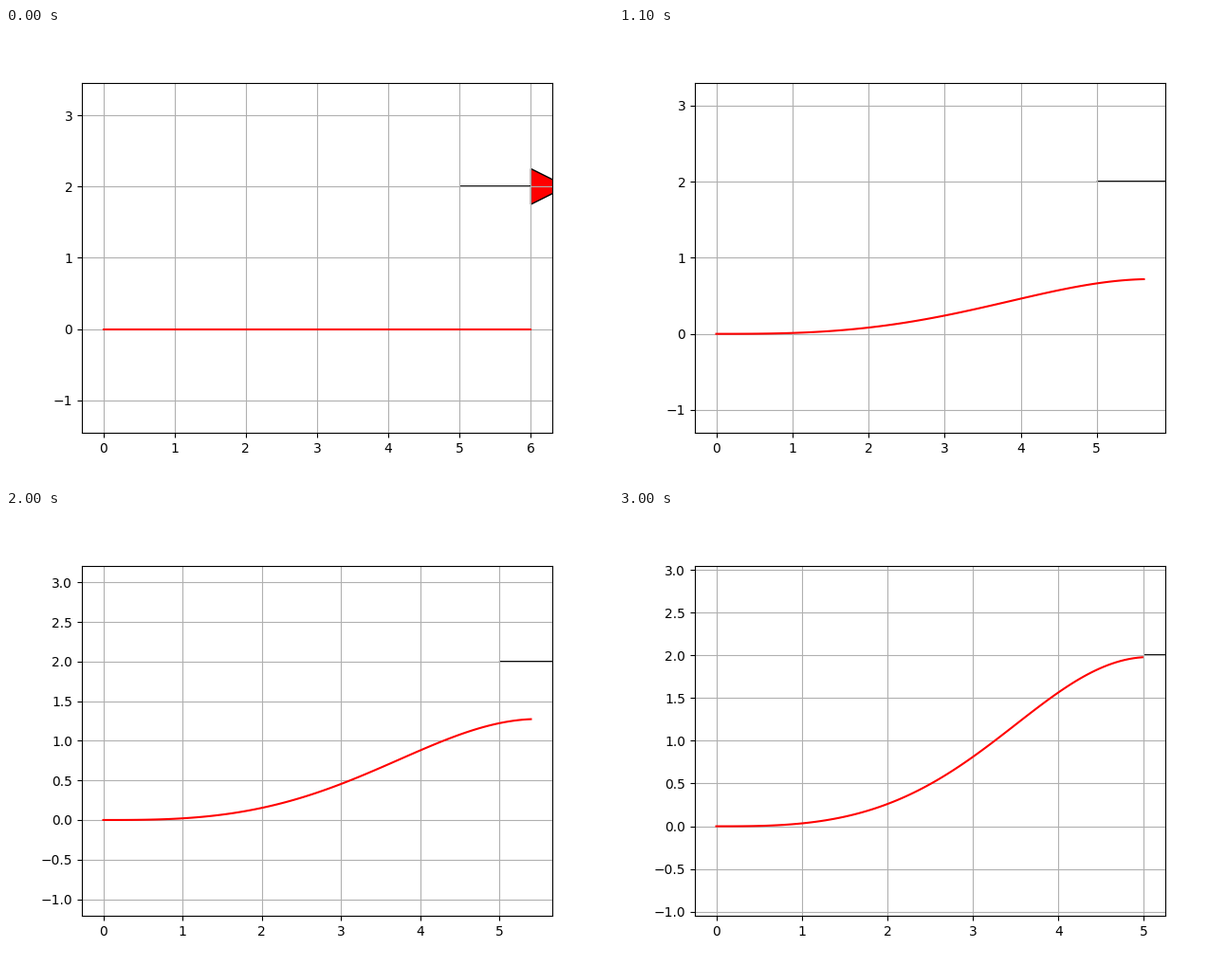
A matplotlib script that plays this animation: 640 px wide and 480 px high, repeating every 3100 ms.

```python
import numpy as np
import matplotlib.pyplot as plt
from matplotlib.animation import FuncAnimation

FRAMES = 31
INTERVAL = 100
LENGTH = 6
GOAL = (5, 2)

# Key points of the free tip, joined by straight moves
KEYS = (0, 15, 20, 26, 30)
TIP_X = (LENGTH, 5.48, 5.396, 5.144, 4.982)
TIP_Y = (0, 0.98, 1.273, 1.648, 1.977)

fig, ax = plt.subplots(figsize=(6.4, 4.8), dpi=100)
ax.grid(True)
ax.arrow(*GOAL, 1, 0, head_width=0.5, head_length=0.5, fc="red", ec="black")
rod, = ax.plot([], [], color="red")

box = ax.get_position()
ASPECT = box.height * 4.8 / (box.width * 6.4)


def bezier(points, n=100):
    """Quartic Bezier curve through five control points."""
    t = np.linspace(0, 1, n)
    weights = [c * t**k * (1 - t)**(4 - k)
               for k, c in enumerate((1, 4, 6, 4, 1))]
    return np.transpose(weights) @ np.array(points)


def rod_curve(x, y):
    """Rod clamped flat at the origin, its outer controls dragged by the tip."""
    pull = LENGTH - x
    return bezier([
        (0, 0),
        (LENGTH / 4, 0),
        (LENGTH / 2 - 0.15 * pull, 0),
        (LENGTH * 3 / 4 - 0.8 * pull, 0.955 * y),
        (x, y),
    ])


def fit_view(right):
    """Equal scale on both axes, 5 % side margins, centred on y = 1."""
    half = 1.1 * right * ASPECT / 2
    ax.set_xlim(-0.05 * right, 1.05 * right)
    ax.set_ylim(1 - half, 1 + half)


def update(i):
    x = np.interp(i, KEYS, TIP_X)
    y = np.interp(i, KEYS, TIP_Y)
    rod.set_data(*rod_curve(x, y).T)
    fit_view(max(x, GOAL[0]))
    return rod,


anim = FuncAnimation(fig, update, frames=FRAMES, interval=INTERVAL,
                     repeat=True, blit=False)
plt.show()
```
